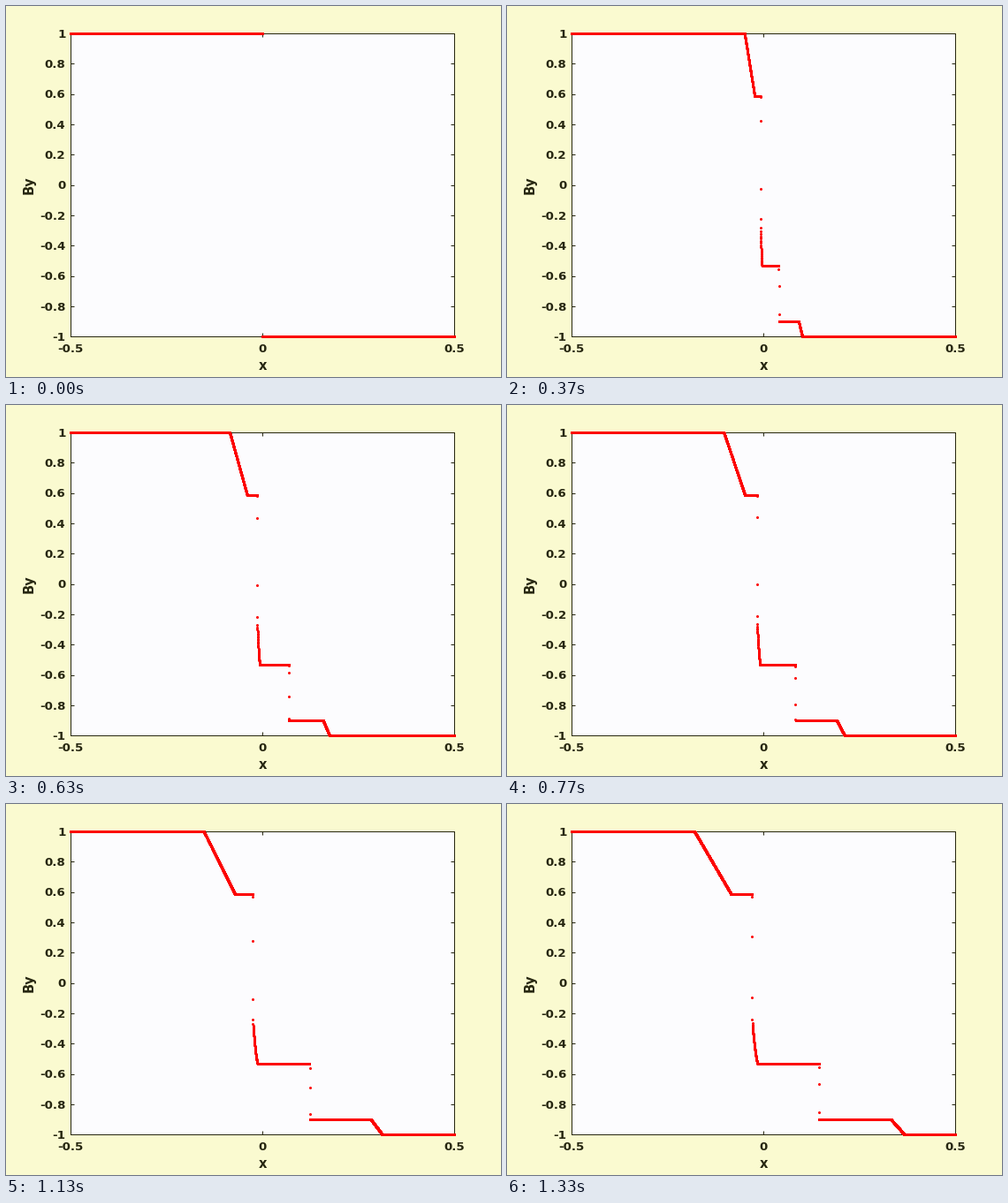
Recreate the animation shown at these times as a matplotlib script. Size 560x420 px, loop 1.36 s.

```python
import numpy as np
import matplotlib.pyplot as plt
from matplotlib.animation import FuncAnimation

W, H, DPI = 560, 420, 100
PX = 72 / DPI                      # one pixel in points
LEFT, TOP, RIGHT, BOTTOM = 73.2, 31.2, 507.2, 374.2
PAPER, PANEL, INK, RED = "#fafad0", "#fcfcfe", "#262610", "#fc0000"

CELLS = 6000
cell = np.arange(CELLS) - CELLS // 2
x = (cell + 0.5) / CELLS

# Smeared shock profiles: offset from the front in cells, value
COMPOUND = np.array([
    (-0.7, 0.85), (-0.14, 0.832), (0.43, 0.70), (0.5, 0.685), (0.825, 0.575),
    (0.885, 0.515), (1.43, 0.255), (1.5, 0.23), (1.825, 0.17), (1.885, 0.145),
    (2.45, 0.05), (2.83, 0.03), (3.5, 0.01), (4.5, 0)]).T
SLOW = np.array([
    (-1.7, -0.533), (-0.9, -0.553), (-0.75, -0.565), (-0.41, -0.585),
    (0.1, -0.665), (0.24, -0.69), (0.38, -0.72), (0.59, -0.745),
    (1.1, -0.852), (1.38, -0.88), (1.59, -0.89), (2.3, -0.9)]).T


def field(n):
    """By after n output steps; every wave moves at a constant speed."""
    if n == 0:
        return np.where(cell < 0, 1.0, -1.0)
    s = cell + 0.025 + 4.495 * n           # distance from the compound wave
    q = cell - 0.3 - 21.69 * n             # distance from the slow shock
    left = np.interp(cell, [-27 * n, -12.6 * n], [1, 0.585])
    fan = np.clip((s - 2) / (2.245 * n), 0, 1)
    middle = -0.533 + 0.268 * (1 - fan) ** 1.6 + np.interp(s, *COMPOUND)
    shock = np.interp(q, *SLOW)
    right = np.interp(cell, [49.8 * n, 55.1 * n], [-0.9, -1])
    return np.select([s < -0.7, q < -1.7, q < 2.3], [left, middle, shock], right)


fig = plt.figure(figsize=(W / DPI, H / DPI), dpi=DPI, facecolor=PAPER)
ax = fig.add_axes([LEFT / W, 1 - BOTTOM / H, (RIGHT - LEFT) / W,
                   (BOTTOM - TOP) / H], facecolor=PANEL)
ax.set(xlim=(-0.5, 0.5), ylim=(-1, 1))
x_ticks = [-0.5, 0, 0.5]
y_ticks = [i / 5 for i in range(-5, 6)]
ax.set_xticks(x_ticks)
ax.set_yticks(y_ticks)
ax.tick_params(direction="in", length=4 * PX, width=PX, color=INK,
               top=True, right=True, labelleft=False, labelbottom=False)
for spine in ax.spines.values():
    spine.set(linewidth=PX, color=INK)


def label(px, py, text, size=13.33, ha="center", **kw):
    fig.text(px / W, 1 - py / H, text, fontsize=size * PX, ha=ha, va="baseline",
             family="DejaVu Sans", weight="bold", color=INK, **kw)


for v in x_ticks:
    label(290 + 434 * v, 392, f"{v:g}")
for v in y_ticks:
    label(67.5, 202.5 - 171.5 * v + 4.9, f"{v:g}", ha="right")
label(290, 412, "x", 14.67)
label(30.3, 202.5, "By", 14.67, rotation=90, rotation_mode="anchor")

dots, = ax.plot(x, field(0), "o", ms=3 * PX, mew=0, color=RED,
                clip_on=False, zorder=5)


def draw(tick):
    # 30 pictures a second on a 10 ms clock
    dots.set_ydata(field(int((tick + 0.5) * 0.3)))
    return dots,


anim = FuncAnimation(fig, draw, frames=136, interval=10, repeat=True,
                     repeat_delay=0, blit=False)
plt.show()
```
